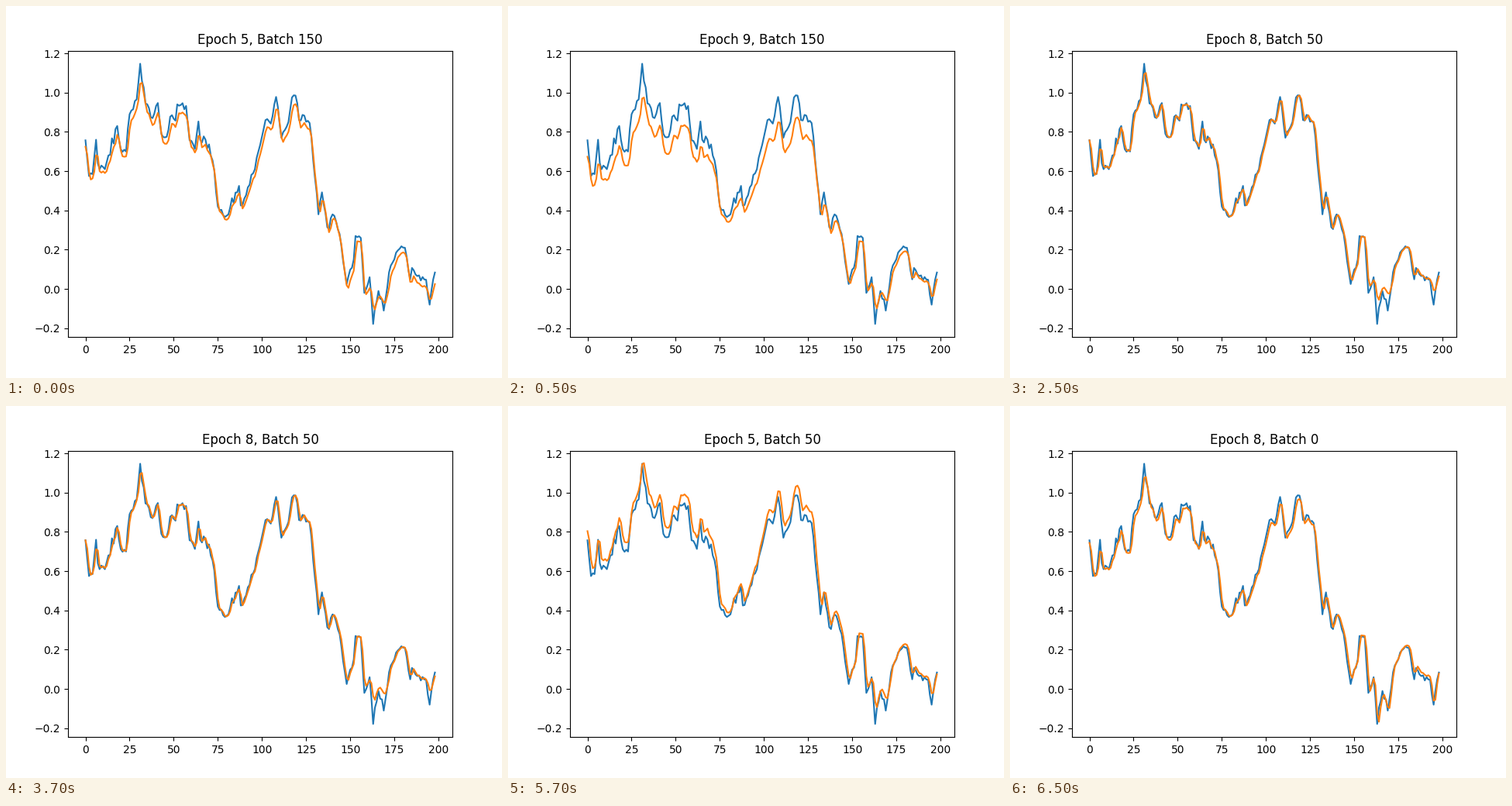
A matplotlib script for the animation above (8 s loop, 640 by 480 pixels).

```python
import numpy as np
import matplotlib.pyplot as plt
from matplotlib.animation import FuncAnimation

plt.rcParams["font.family"] = "DejaVu Sans"

DAYS = np.arange(199)

# Main turning points of the price as (day, value).
TURNS = [
    (0, .757), (2, .575), (4, .585), (6, .76), (7, .64), (11, .61),
    (18, .83), (20, .712), (23, .7), (25, .89), (29, .965), (31, 1.147),
    (34, .945), (38, .87), (41, .947), (43, .79), (46, .775), (49, .885),
    (51, .857), (52, .94), (57, .932), (59, .757), (62, .713), (64, .853),
    (65, .76), (68, .76), (72, .655), (75, .42), (81, .38), (87, .525),
    (88, .425), (96, .61), (102, .86), (105, .842), (108, .978),
    (111, .77), (115, .85), (117, .975), (119, .985), (121, .86),
    (127, .845), (132, .38), (134, .492), (138, .305), (140, .38),
    (144, .28), (148, .025), (152, .15), (153, .27), (156, .26),
    (158, -.02), (161, .06), (163, -.178), (166, -.01), (169, -.11),
    (172, .085), (178, .205), (181, .21), (183, .095), (193, .047),
    (195, -.08), (198, .084),
]

# Each training step bends the forecast away from these levels.
LEVELS = [-.15, .05, .4, .8, 1.1]
STEPS = [
    (1, "Epoch 5, Batch 150", [-.11, .01, .385, .765, 1.05]),
    (4, "Epoch 9, Batch 150", [-.105, .035, .37, .71, .975]),
    (4, "Epoch 8, Batch 50", [-.06, .05, .4, .8, 1.1]),
    (4, "Epoch 5, Batch 50", [-.1, .06, .42, .85, 1.15]),
    (3, "Epoch 8, Batch 0", [-.178, .065, .4, .785, 1.08]),
]
TIMELINE = [(title, bent) for ticks, title, bent in STEPS for _ in range(ticks)]


def jagged_line(turns, roughness):
    """Join the turns, with small daily noise on the days between them."""
    days, values = zip(*turns)
    noise = np.random.default_rng(4).normal(0, roughness, DAYS.size)
    noise[list(days)] = 0
    return np.interp(DAYS, days, values) + noise


price = jagged_line(TURNS, .014)
previous = np.concatenate([price[:1], price[:-1]])
forecast = .45 * price + .55 * previous  # trails the price by half a day

fig, ax = plt.subplots(figsize=(6.4, 4.8), dpi=100)
ax.plot(DAYS, price, color="#1f77b4", lw=1.5)
forecast_line, = ax.plot(DAYS, forecast, color="#ff7f0e", lw=1.5)
ax.set_xlim(-9.9, 207.9)
ax.set_ylim(-.2449, 1.2136)
heading = ax.set_title("")


def update(frame):
    title, bent = TIMELINE[frame]
    heading.set_text(title)
    forecast_line.set_ydata(np.interp(forecast, LEVELS, bent))
    return forecast_line, heading


anim = FuncAnimation(fig, update, frames=len(TIMELINE), interval=500,
                     repeat=True, repeat_delay=0, blit=False)
plt.show()
```
